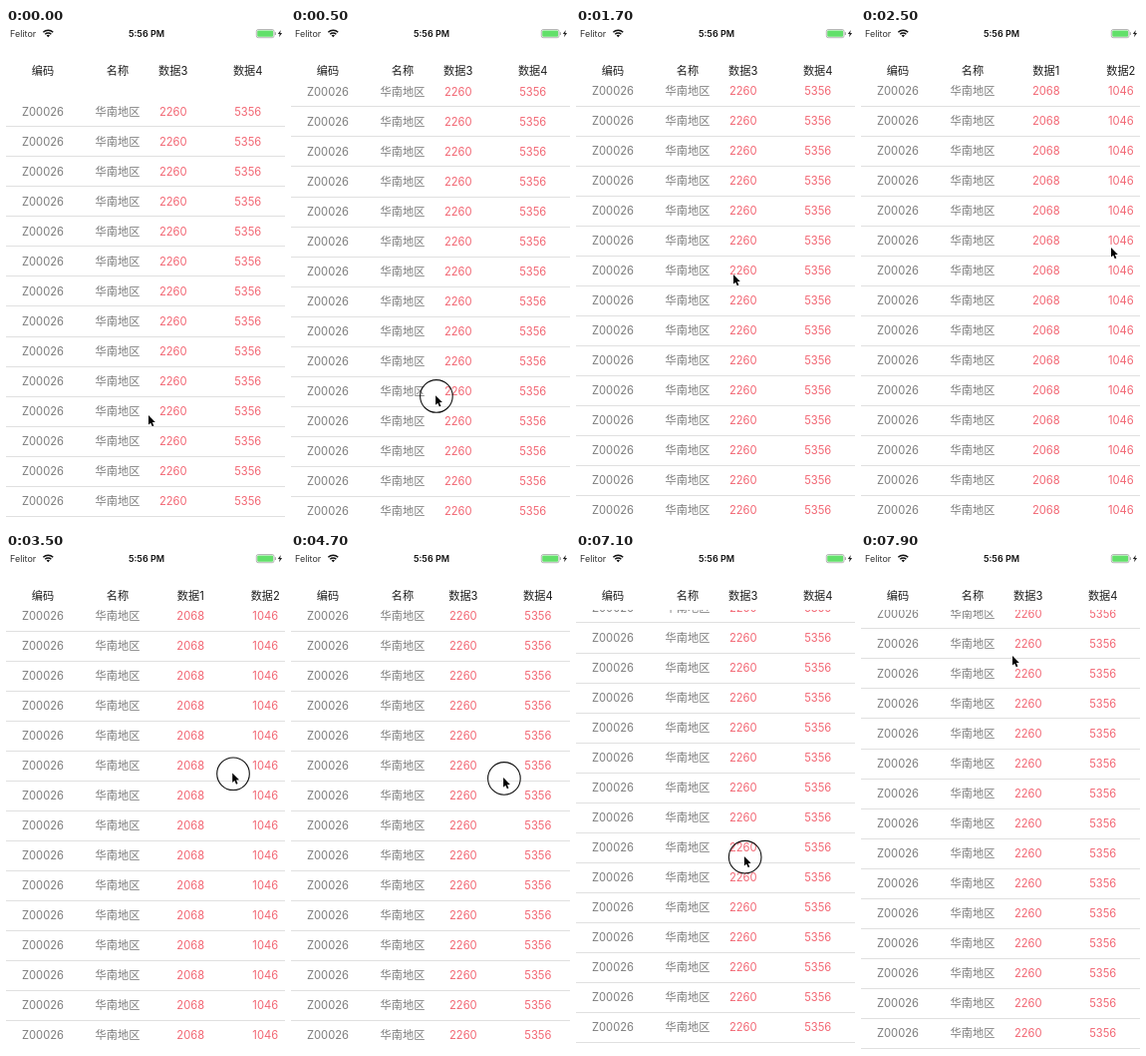
An HTML page with a canvas for the animation above (8 s loop, 280x498 px).

```html
<!DOCTYPE html>
<html lang="zh-CN">
<head>
<meta charset="utf-8">
<title>Table</title>
<style>
html, body { margin: 0; width: 100%; height: 100%; overflow: hidden; background: #fff; }
canvas { display: block; width: 280px; height: 498px; }
</style>
</head>
<body>
<canvas id="stage"></canvas>
<script>
const W = 280, H = 498, LOOP = 8000, STEP = 100;
const ROWS = 15, ROW_H = 30.04, COL_W = 75, TOP = 58, PANE_X = 149;
const PANE_H = H - TOP, MAX_X = 4 * COL_W - (W - PANE_X), MAX_Y = ROWS * ROW_H - PANE_H;
const GLIDE = 400, SLOP = 10;
const FONT = "Inter, 'Noto Sans CJK SC', 'Noto Sans CJK', sans-serif";
const FIXED = [['编码', 'Z00026'], ['名称', '华南地区']];
const DATA = [['数据1', '2068'], ['数据2', '1046'], ['数据3', '2260'], ['数据4', '5356']];

// Swipes: sideways ones come to rest at column offset `pan`,
// upright ones pull the rows from offset `base`.
const SWIPES = [
  { press: 200, lift: 1000, from: [143, 388], to: [158, 247], base: 0 },
  { press: 2100, lift: 2500, from: [166, 247], to: [251, 220], pan: 0, rest: 2600 },
  { press: 3300, lift: 3900, from: [251, 220], to: [37, 224], pan: MAX_X, rest: 4200 },
  { press: 4300, lift: 4900, from: [166, 226], to: [272, 224], pan: 0, rest: 5700 },
  { press: 5900, lift: 6400, from: [272, 224], to: [72, 233], pan: MAX_X, rest: 6700 },
  { press: 6900, lift: 7500, from: [171, 329], to: [152, 103], base: MAX_Y }
];

const canvas = document.getElementById('stage');
const ctx = canvas.getContext('2d');
const ratio = window.devicePixelRatio || 1;
canvas.width = W * ratio;
canvas.height = H * ratio;

const progress = (t, from, to) => Math.min(1, Math.max(0, (t - from) / (to - from)));
const mix = (a, b, k) => a + (b - a) * k;
const mixPoint = (a, b, k) => a.map((v, i) => mix(v, b[i], k));
const flick = k => k * k;
const smooth = k => k * k * (3 - 2 * k);
const swing = k => k < 0.5 ? 16 * k ** 5 : 1 - 16 * (1 - k) ** 5;

// Critically damped return after a release.
function settle(ms) {
  const k = 14 * ms / 1000;
  return (1 + k) * Math.exp(-k);
}

function pointer(t) {
  let tip = SWIPES[0].from;
  for (const { press, lift, from, to } of SWIPES) {
    tip = mixPoint(tip, from, smooth(progress(t, press - GLIDE, press)));
    tip = mixPoint(tip, to, flick(progress(t, press, lift)));
  }
  return tip;
}

function scrollX(t) {
  let x = MAX_X;
  for (const { press, rest, pan } of SWIPES)
    if (pan !== undefined) x = mix(x, pan, swing(progress(t, press, rest)));
  return x;
}

// Row offset under the finger, with resistance past the end.
function pull(t, { press, lift, from, to, base }) {
  const moved = (from[1] - to[1]) * flick(progress(t, press, lift));
  const want = base + Math.max(0, moved - SLOP);
  if (want <= MAX_Y) return want;
  return MAX_Y + PANE_H * (1 - 1 / ((want - MAX_Y) * 0.55 / PANE_H + 1));
}

function scrollY(t) {
  const swipe = SWIPES.findLast(s => s.base !== undefined && t >= s.press);
  if (!swipe) return -10 * settle(t);
  const held = pull(t, swipe);
  return t <= swipe.lift ? held : mix(MAX_Y, held, settle(t - swipe.lift));
}

function text(str, x, y, color, size = 11.2, weight = 400, align = 'center') {
  ctx.font = `${weight} ${size}px ${FONT}`;
  ctx.fillStyle = color;
  ctx.textAlign = align;
  ctx.fillText(str, x, y);
}

function clipped(x, y, draw) {
  ctx.save();
  ctx.beginPath();
  ctx.rect(x, y, W - x, H - y);
  ctx.clip();
  draw();
  ctx.restore();
}

function polygon(points) {
  ctx.beginPath();
  points.forEach(([x, y]) => ctx.lineTo(x, y));
  ctx.closePath();
}

function drawStatus() {
  text('Felitor', 4, 9, '#333', 9, 400, 'left');
  text('5:56 PM', 141, 9, '#111', 9, 600);

  ctx.strokeStyle = ctx.fillStyle = '#111';
  ctx.lineWidth = 1.5;
  for (const r of [7, 4.3]) {
    ctx.beginPath();
    ctx.arc(42.3, 9.2, r, -Math.PI * 0.75, -Math.PI * 0.25);
    ctx.stroke();
  }
  ctx.beginPath();
  ctx.moveTo(42.3, 9.3);
  ctx.arc(42.3, 9.3, 2.4, -Math.PI * 0.75, -Math.PI * 0.25);
  ctx.fill();

  ctx.strokeStyle = '#999';
  ctx.lineWidth = 0.7;
  ctx.beginPath();
  ctx.roundRect(251.3, 1.5, 17.7, 8.2, 1.8);
  ctx.stroke();
  ctx.fillStyle = '#62e06a';
  ctx.beginPath();
  ctx.roundRect(252.2, 2.4, 15.9, 6.4, 1);
  ctx.fill();
  ctx.fillStyle = '#999';
  ctx.fillRect(269.8, 4.2, 1, 2.8);
  ctx.fillStyle = '#222';
  polygon([[275.8, 2], [272.8, 6.1], [274.7, 6.1], [274, 9.2], [277.1, 5], [275.2, 5]]);
  ctx.fill();
}

function drawColumns(columns, left, y, color) {
  columns.forEach(([title, value], i) => {
    const x = left + (i + 0.5) * COL_W;
    text(title, x, 47, '#1c1c1c');
    clipped(0, 57, () => {
      for (let r = 0; r < ROWS; r++) text(value, x, y + r * ROW_H + 19.5, color);
    });
  });
}

function drawTable(t) {
  const y = TOP - scrollY(t);
  drawColumns(FIXED, -0.5, y, '#7c7c7c');
  clipped(PANE_X, 0, () => drawColumns(DATA, PANE_X + 0.2 - scrollX(t), y, '#f26673'));
  clipped(0, 57, () => {
    ctx.fillStyle = '#e0e0e0';
    for (let r = 1; r <= ROWS; r++) ctx.fillRect(0, Math.round(y + r * ROW_H + 0.2), W, 1);
  });
}

function drawPointer(t) {
  const [x, y] = pointer(t);
  ctx.save();
  ctx.translate(x, y);
  if (SWIPES.some(s => t >= s.press && t < s.lift)) {
    ctx.strokeStyle = '#111';
    ctx.lineWidth = 1.1;
    ctx.beginPath();
    ctx.arc(0.8, 0.8, 16.3, 0, Math.PI * 2);
    ctx.stroke();
  }
  ctx.scale(0.92, 0.92);
  polygon([[0, 0], [0, 10.4], [2.4, 8.3], [4.1, 12.2], [5.8, 11.4], [4.2, 7.7], [7.4, 7.5]]);
  ctx.lineJoin = 'round';
  ctx.lineWidth = 1.4;
  ctx.strokeStyle = '#fff';
  ctx.stroke();
  ctx.fillStyle = '#000';
  ctx.fill();
  ctx.restore();
}

function frame() {
  const t = Math.floor((performance.now() - start) % LOOP / STEP) * STEP;
  ctx.setTransform(ratio, 0, 0, ratio, 0, 0);
  ctx.fillStyle = '#fff';
  ctx.fillRect(0, 0, W, H);
  drawStatus();
  drawTable(t);
  drawPointer(t);
  requestAnimationFrame(frame);
}

const start = performance.now();
frame();
</script>
</body>
</html>
```
